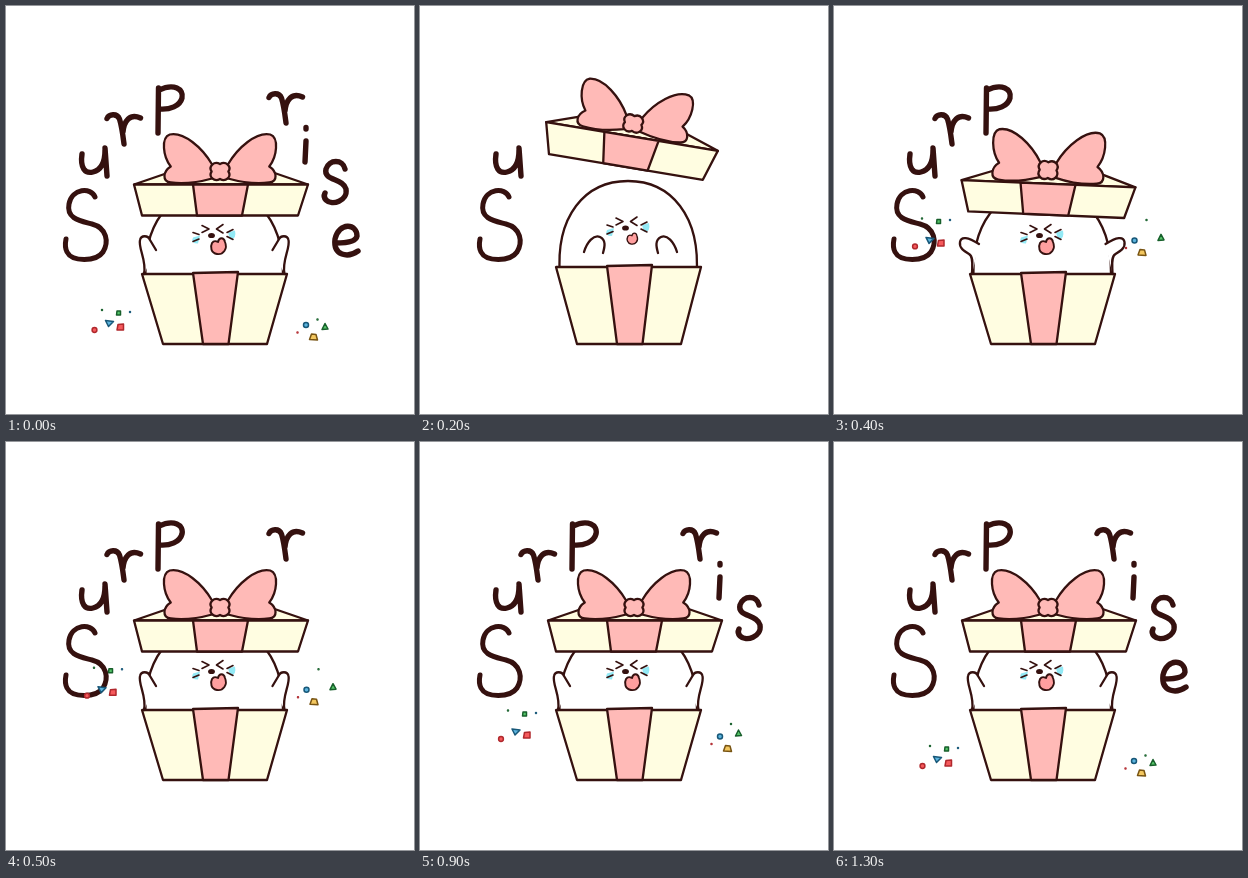
Write an HTML page that moves like this. It is 408x408 px and loops after 1.5 s.

```html
<!DOCTYPE html>
<html lang="en">
<head>
<meta charset="utf-8">
<title>Surprise</title>
<style>
  html, body { margin: 0; height: 100%; overflow: hidden; background: #fff; }
  svg { display: block; width: 100vw; height: 100vh; }
</style>
</head>
<body>
<svg id="stage" viewBox="0 0 408 408" role="img" aria-label="Surprise"
  stroke-linecap="round" stroke-linejoin="round"></svg>
<script>
const INK = '#35110f', CREAM = '#fffde1', PINK = '#ffbab7', WHITE = '#fff';
const LOOP = 1500;
const STARTS = [0, 100, 200, 300, 400, 500, 700, 900, 1100, 1300];

const path = (d, fill = 'none', width = 2.3, stroke = INK) =>
  `<path d="${d}" fill="${fill}" stroke="${stroke}" stroke-width="${width}"/>`;
const group = (transform, content) => `<g transform="${transform}">${content}</g>`;

const R = 'M101 112.5C103 108 111 107 113.5 113C116 121 117 130 118 138M117 126C118 115 124 107 134.5 112';
const LETTERS = [
  'M89 191C85 181 66 182 63 198C60 213 75 215 86 218C101 222 103 236 97 246C90 256 66 256 61 246C59 242 59 238 60 233',
  'M76 148C74 162 79 168 87 166C95 164 99 157 99 144M99 142L101 170',
  R,
  'M152.5 82L152 127M153 84C168 77 178 83 176 92C174 100 164 104 153 103',
  R,
  'M300 121.5V123M300 135L299 156',
  'M339 163C337 153 323 153 320 163C317 175 337 172 340 183C342 195 326 200 320 194C318 192 318 189 319 187',
  'M330 237C340 237 350 236 351 230C351 217 333 216 329 233C327 250 342 252 352 245'
].map((d, i) => group(i === 4 ? 'translate(162 -21)' : '', path(d, 'none', i ? 5.4 : 5)));

const ARMS = {
  tucked: { d: 'M164 246C167 236 174 228 180 231C186 234 185 240 183 247', mirror: 421 },
  wide: { d: 'M138 268C138 260 140 251 135 248C130 245 125 242 126 236C127 230 134 231 145 238', mirror: 416.5 },
  raised: { d: 'M138 268C141 255 132 242 134 234C135 229 142 229 144 234L150 244', mirror: 416.5 }
};

// lid: [x, y, angle, width scale, bow height scale]
const POSES = {
  squash: { squash: true, dy: 62, lid: [209, 222.3, -2.85, 1.03, .84] },
  pop: { dy: 0, rim: 261, arms: ARMS.tucked, mouth: .7, lid: [212, 130.5, 9.5, 1, 1] },
  drop: { dy: 4, rim: 265, arms: ARMS.wide, mouth: 1, lid: [214, 153, 5, 1, 1.04] },
  wave: { dy: 7.5, rim: 268, arms: ARMS.wide, mouth: 1, lid: [214.5, 177.8, 2.4, 1, 1.05] },
  rest: { dy: 7.5, rim: 268, arms: ARMS.raised, mouth: 1, lid: [215, 178.5, 0, 1, 1] }
};
const SEQUENCE = ['rest', 'squash', 'pop', 'drop', 'wave'];

function lid([x, y, angle, wide, tall]) {
  const wing = 'M-8-20C-18-37-37-53-51-50C-60-47-58-28-50-18C-58-13-59-3-50-2C-35 0-19-3-8-6Z';
  const knot = 'M0-20.5C-6-24-12-18-8.5-13C-12-8-6-2 0-5.5C6-2 12-8 8.5-13C12-18 6-24 0-20.5Z';
  const box = path('M-87 0L-55-11H55L87 0Z', CREAM) +
    path('M-87 0H87L77 31H-79Z', CREAM) +
    path('M-28 0H27L21 31H-24Z', PINK);
  const bow = path(wing, PINK) + group('scale(-1 1)', path(wing, PINK)) + path(knot, PINK);
  return group(`translate(${x} ${y}) rotate(${angle})`,
    group(`scale(${wide} 1)`, box) + group(`translate(-1 0) scale(.985 ${tall})`, bow));
}

function face(dy, mouth = 0) {
  const tears = path('M194 222L187 224Q184 230 192 230ZM222 219L229 217Q231 226 224 226Z', '#93e9f5', 0);
  const lines = path('M196 212L203 215.5L196 219M217 211L210.5 215.5L217 219.5' +
    'M187 219L193 221M187 228L193 225.5M221 219L227 216M221 223L227 226', 'none', 1.6);
  const nose = `<ellipse cx="205.5" cy="222" rx="3.4" ry="2.6" fill="${INK}"/>`;
  const lips = group(`translate(212 232.5) scale(${mouth})`,
    path('M-6-3C-4-6-2-5 0-4C1-9 6-9 7-4C10 3 5 9-1 8C-7 7-8 1-6-3Z', '#ff9f9f', 1.9));
  return group(`translate(0 ${dy})`, tears + lines + nose + (mouth ? lips : ''));
}

function character({ squash, dy, rim, arms, mouth }) {
  if (squash) {
    return path('M133 278L146 275H274L285.5 277', CREAM) +
      path('M138 250Q139 268 142 295H278Q280 268 278.5 245', WHITE) + face(dy) +
      path('M133 278Q210 294 285.5 277C286 300 278 326 263 338H155C140 328 130 305 133 278Z', CREAM) +
      path('M184.5 287Q212 287 239 285C239 305 235 325 226 338H195C186 325 183 308 184.5 287Z', PINK);
  }
  const arm = path(arms.d, WHITE);
  return group(`translate(0 ${dy})`, path('M140 270C135 210 165 175 208 175C251 175 281 210 276.5 270', WHITE)) +
    path(`M136 ${rim}H281L261 338H157Z`, CREAM) +
    path(`M187 ${rim - 1}L232 ${rim - 2}L222.5 338H197Z`, PINK) +
    arm + group(`translate(${arms.mirror} 0) scale(-1 1)`, arm) + face(dy, mouth);
}

const RED = ['#f55a5c', '#b0282d'], BLUE = ['#5cb4de', '#175778'],
  GREEN = ['#55c468', '#175f2b'], GOLD = ['#f3c75f', '#785413'];
const disc = r => `M${-r} 0A${r} ${r} 0 1 0 ${r} 0A${r} ${r} 0 1 0 ${-r} 0Z`;
const DOT = disc(.5);

// shape, colours, then positions while floating, falling and landed
const CONFETTI = [
  [disc(2.4), RED, [81, 267], [81, 297], [88.5, 324]],
  ['M-4-3L4-2L-1 3Z', BLUE, [96, 261], [96, 290], [103.5, 317.5]],
  ['M-2.5-2.5L3-3V3H-3.5Z', RED, [107, 263.5], [107, 293], [114.5, 321]],
  ['M-1.5-2H2V2H-2Z', GREEN, [104.5, 242], [104.5, 272], [112.5, 307]],
  [DOT, GREEN, [88, 239], [88, 268.5], [96, 304]],
  [DOT, BLUE, [116, 240.5], [116, 271], [124, 306]],
  [disc(2.5), BLUE, [300.5, 261], [300, 294.5], [300, 319]],
  ['M0-3L3 2.5L-3 3Z', GREEN, [327, 258], [318.5, 291], [319, 320.5]],
  [DOT, GREEN, [312.5, 240.5], [311, 282], [311.5, 313.5]],
  [DOT, RED, [292, 268.5], [291.5, 302], [291.5, 326.5]],
  ['M-2-3L2.5-2.5L4 3L-4 2.5Z', GOLD, [308, 273], [307.5, 306.5], [307.5, 331]]
];

function confetti(step) {
  if (step > 0 && step < 4) return '';
  return CONFETTI.map(([shape, [fill, stroke], floating, falling, landed]) => {
    let [x, y] = landed;
    if (step === 8 && y < 323) y -= 7;
    if (step === 7) [x, y] = falling;
    if (step >= 4 && step <= 6) {
      [x, y] = floating;
      y -= (6 - step) * 13.3;
    }
    return group(`translate(${x} ${y})`, path(shape, fill, 1.5, stroke));
  }).join('');
}

function draw(step) {
  const pose = POSES[SEQUENCE[step] || 'rest'];
  const letters = LETTERS.slice(0, step || LETTERS.length).join('');
  stage.innerHTML = letters + character(pose) + lid(pose.lid) + confetti(step);
}

const stage = document.getElementById('stage');
const began = performance.now();
let shown = -1;
function tick() {
  const time = (performance.now() - began) % LOOP;
  const step = STARTS.filter(start => start <= time).length - 1;
  if (step !== shown) draw(shown = step);
  requestAnimationFrame(tick);
}
tick();
</script>
</body>
</html>
```
